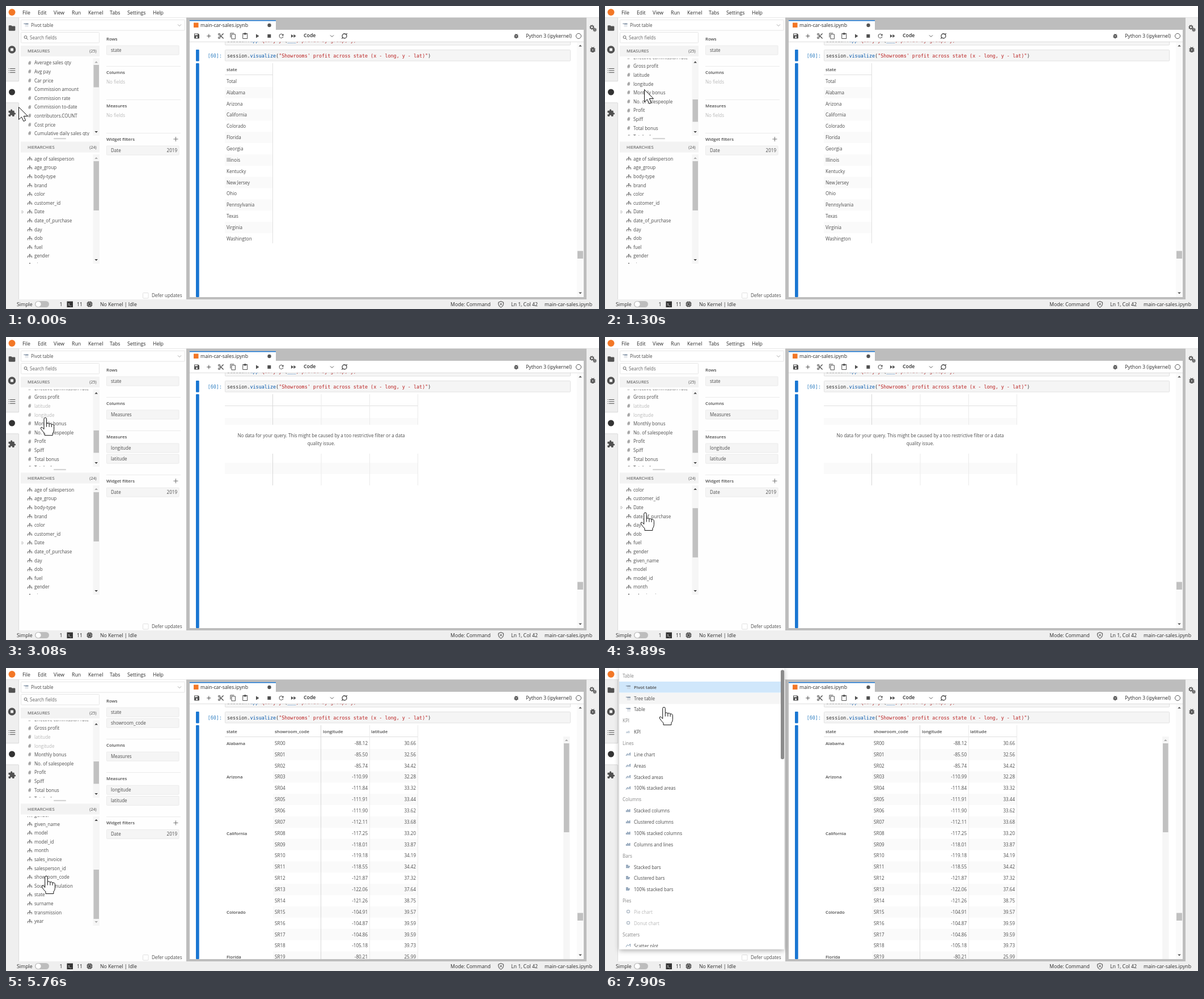
Recreate the animation shown at these times as an HTML page. Size 1046 by 535 pixels, loop 7.99 s.

```html
<!DOCTYPE html>
<html lang="en">
<head>
<meta charset="utf-8">
<title>Pivot table in a notebook</title>
<style>
  html, body { margin: 0; width: 100%; height: 100%; overflow: hidden; background: #fff; }
  svg { display: block; width: 100vw; height: 100vh; }
  text { font-family: "Open Sans", "Noto Sans", sans-serif; white-space: pre; }
  .mono { font-family: "DejaVu Sans Mono", monospace; }
</style>
</head>
<body>
<svg viewBox="0 0 1046 535">
  <defs>
    <clipPath id="measuresClip"><rect x="23" y="92.5" width="131" height="136.5"/></clipPath>
    <clipPath id="hierarchiesClip"><rect x="23" y="262" width="131" height="193"/></clipPath>
    <clipPath id="notebookClip"><rect x="324" y="63" width="695" height="451"/></clipPath>
    <clipPath id="menuClip"><rect x="25" y="3" width="291" height="490"/></clipPath>
    <filter id="shadow" x="-10%" y="-10%" width="120%" height="120%">
      <feDropShadow dx="0" dy="3" stdDeviation="4" flood-opacity=".3"/>
    </filter>
  </defs>
  <g id="chrome"></g>
  <g id="live"></g>
</svg>
<script>
const LOOP = 7990, ROW = 15.6, LINE = 19.86, NOTCH = 70.8;
const INK = '#4c4c4c', UI = '#2b2b2b', PALE = '#b9b9b9', BLUE = '#1976d2';

// Drawing helpers: each returns SVG markup. Text y is the visual middle.
const text = (x, y, s, { size = 8.05, fill = INK, weight = 400, anchor = 'start', cls = '' } = {}) =>
  `<text x="${x}" y="${y + size * .36}" font-size="${size}" fill="${fill}" font-weight="${weight}" text-anchor="${anchor}" class="${cls}">${s}</text>`;
const uiText = (x, y, s, weight = 400) => text(x, y, s, { size: 8.75, fill: UI, weight });
const strong = (x, y, s) => text(x, y, s, { size: 7.75, weight: 600 });
const rect = (x, y, w, h, fill, extra = '') =>
  `<rect x="${x}" y="${y}" width="${w}" height="${h}" fill="${fill}" ${extra}/>`;
const box = (x, y, w, h, fill, stroke) => rect(x + .5, y + .5, w - 1, h - 1, fill, `stroke="${stroke}" rx="1"`);
const path = (d, fill = 'none', stroke = 'none', width = 1) =>
  `<path d="${d}" fill="${fill}" stroke="${stroke}" stroke-width="${width}" fill-rule="evenodd"/>`;
const circle = (x, y, r, fill, extra = '') => `<circle cx="${x}" cy="${y}" r="${r}" fill="${fill}" ${extra}/>`;
const at = (x, y, content, scale = 1) => `<g transform="translate(${x} ${y}) scale(${scale})">${content}</g>`;
const clip = (id, content) => `<g clip-path="url(#${id})">${content}</g>`;
const chevron = (x, y, color) => path(`M${x - 3} ${y - 1.5}l3 3 3-3`, 'none', color, 1);
const triangle = (x, y, dir, color) => path(`M${x - 2.8} ${y + 1.5 * dir}h5.6l-2.8 ${-3 * dir}z`, color);

const GLYPHS = {
  folder: 'M10 4H4c-1.1 0-2 .9-2 2v12c0 1.1.9 2 2 2h16c1.1 0 2-.9 2-2V8c0-1.1-.9-2-2-2h-8z',
  halt: 'M12 0a12 12 0 1 0 0 24 12 12 0 0 0 0-24zM7.5 8.3q0-.8.8-.8h7.4q.8 0 .8.8v7.4q0 .8-.8.8H8.3q-.8 0-.8-.8z',
  list: 'M2 5h2v2H2zm0 6h2v2H2zm0 6h2v2H2zM6 5h16v2H6zm0 6h16v2H6zm0 6h16v2H6z',
  puzzle: 'M20.5 11H19V7c0-1.1-.9-2-2-2h-4V3.5a2.5 2.5 0 0 0-5 0V5H4c-1.1 0-2 .9-2 2v3.8h1.5a2.7 2.7 0 0 1 0 5.4H2V20c0 1.1.9 2 2 2h3.8v-1.5a2.7 2.7 0 0 1 5.4 0V22H17c1.1 0 2-.9 2-2v-4h1.5a2.5 2.5 0 0 0 0-5z',
  bug: 'M20 8h-2.8a6 6 0 0 0-1.8-2L17 4.4 15.6 3l-2.2 2.2a6 6 0 0 0-2.8 0L8.4 3 7 4.4 8.6 6a6 6 0 0 0-1.8 2H4v2h2.1L6 12H4v2h2l.1 2H4v2h2.8a6 6 0 0 0 10.4 0H20v-2h-2.1l.1-2h2v-2h-2l-.1-2H20zm-6 8h-4v-2h4zm0-4h-4v-2h4z',
  save: 'M17 3H5c-1.1 0-2 .9-2 2v14c0 1.1.9 2 2 2h14c1.1 0 2-.9 2-2V7zm-5 16a3 3 0 1 1 0-6 3 3 0 0 1 0 6zm3-10H5V5h10z',
  add: 'M19 13h-6v6h-2v-6H5v-2h6V5h2v6h6z',
  cut: 'M9.6 7.6A4 4 0 1 0 7.6 9.6L10 12l-2.4 2.4a4 4 0 1 0 2 2L12 14l7 7h3v-1zM6 8a2 2 0 1 1 0-4 2 2 0 0 1 0 4zm0 12a2 2 0 1 1 0-4 2 2 0 0 1 0 4zM19 3l-6 6 2 2 7-7V3z',
  copy: 'M16 1H4c-1.1 0-2 .9-2 2v14h2V3h12zm3 4H8c-1.1 0-2 .9-2 2v14c0 1.1.9 2 2 2h11c1.1 0 2-.9 2-2V7c0-1.1-.9-2-2-2zm0 16H8V7h11z',
  paste: 'M19 2h-4.2a3 3 0 0 0-5.6 0H5a2 2 0 0 0-2 2v16a2 2 0 0 0 2 2h14a2 2 0 0 0 2-2V4a2 2 0 0 0-2-2zm0 18H5V4h2v3h10V4h2z',
  run: 'M8 5v14l11-7z',
  stop: 'M6 6h12v12H6z',
  restart: 'M17.7 6.3A8 8 0 1 0 19.7 14h-2.1A6 6 0 1 1 16.2 7.8L13 11h7V4z',
  forward: 'M4 18l8.5-6L4 6zm9-12v12l8.5-6z',
};
const glyph = (name, x, y, size = 12, fill = '#505050') =>
  at(x - size / 2, y - size / 2, path(GLYPHS[name], fill), size / 24);
const gear = (x, y, r) => circle(x, y, r, 'none', 'stroke="#505050" stroke-width="1.5"') +
  circle(x, y, r + 1.2, 'none', `stroke="#505050" stroke-width="1.3" pathLength="16" stroke-dasharray="1 1"`);
const tableIcon = (x, y) => rect(x - 2, y - 3, 6, 2, '#8292a5') + rect(x - 4, y - 3, 1.5, 1.5, '#8292a5') +
  path(`M${x - 2} ${y + .5}h6M${x - 2} ${y + 2.5}h6`, 'none', '#c3cad2', .8);

function drawChrome() {
  let s = rect(0, 20, 23, 515, '#efefef') + rect(1024, 20, 22, 498, '#efefef') + rect(0, 518, 1046, 17, '#efefef')
    + rect(0, 20, 1046, .8, '#dcdcdc') + rect(23, 20.8, 295, 497.2, '#fefefe') + rect(22.3, 21, .7, 497, '#d5d5d5')
    + rect(0, 133, 23, 38, '#fff') + rect(0, 132.5, 22, .7, '#ccc') + rect(0, 170.5, 22, .7, '#ccc')
    + rect(318, 20.5, 706, 497.5, '#bdbdbd') + rect(324, 42, 695, 472, '#fff')
    + rect(324, 25, 152, 18, '#fff') + rect(324, 25, 152, 1.5, BLUE);
  s += circle(10.5, 11, 6, '#f37726') + circle(10.5, 152, 5.5, '#333');
  [['File', 29], ['Edit', 56], ['View', 84], ['Run', 116], ['Kernel', 145], ['Tabs', 183], ['Settings', 214], ['Help', 259]]
    .forEach(([label, x]) => s += uiText(x, 12, label));
  s += glyph('folder', 10.5, 39, 14) + glyph('halt', 10.5, 77, 13.5) + glyph('list', 10.5, 114, 14) + glyph('puzzle', 10.5, 189, 14.5)
    + gear(1033.5, 37.5, 2.4) + gear(1038.5, 42, 1.6) + glyph('bug', 1035, 77, 13.5);

  s += rect(331, 29.5, 8.5, 8.5, '#f37726') + uiText(343, 34, 'main-car-sales.ipynb') + circle(464.5, 34, 3.2, '#555');
  Object.keys(GLYPHS).slice(5).forEach((name, i) => s += glyph(name, 336.5 + 21.3 * i, 53));
  s += uiText(525, 52, 'Code', 600) + chevron(575, 53, '#555')
    + circle(597, 53, 4, 'none', 'stroke="#444" stroke-width="1.3"') + path('M592 57.5l3-2M602 48.5l-3 2', 'none', '#444', 1.4)
    + glyph('bug', 900, 53, 11) + uiText(917, 53, 'Python 3 (ipykernel)') + circle(1010, 53, 4.5, '#fff', 'stroke="#555"');

  const code = (x, y, str, fill, anchor) => text(x, y, str, { size: 8.42, fill, cls: 'mono', anchor });
  const string = `"Showrooms' profit across state (x - long, y - lat)"`;
  const span = (fill, str) => `<tspan fill="${fill}">${str}</tspan>`;
  s += clip('notebookClip', box(386, 50, 610, 19.5, '#f5f5f5', '#e0e0e0')
    + code(390, 60.5, `session.${span('#05a', 'app')} ${span('#a22', 'query y')} (` + span('#05a', '___') + span('#a22', ', profit by group, y)'), '#333'));
  s += rect(324, 62.8, 695, .8, '#d6d6d6') + rect(335, 77, 5.7, 20.5, BLUE, 'rx="1"') + rect(335, 101, 5.7, 413, BLUE, 'rx="1"')
    + box(386, 77, 610, 20.5, '#f5f5f5', '#e2e2e2') + code(381, 87.5, '[60]:', '#307fc1', 'end')
    + code(390, 87.5, 'session.' + span('#05a', 'visualize') + '(' + span('#ba2121', string) + ')', '#333')
    + rect(1007, 64, 12, 450, '#fafafa') + triangle(1013, 70, 1, '#555') + triangle(1013, 507, -1, '#555')
    + rect(1008, 432.5, 10, 13.5, '#c1c1c1');

  s += text(42, 56, 'Search fields', { fill: '#666' }) + circle(34.5, 55, 2.4, 'none', 'stroke="#555" stroke-width=".9"')
    + path('M36.3 57l2.5 2.5', 'none', '#555', 1);
  [['MEASURES', 25, 79.5], ['HIERARCHIES', 24, 249]].forEach(([label, n, y]) => s += rect(26, y - 9.5, 139, 19, '#f3f3f3')
    + text(38, y, label, { size: 7.7 }) + text(159.5, y, `(${n})`, { size: 7, anchor: 'end' }));
  s += rect(84, 233, 22, 2.2, '#d4d4d4', 'rx="1"') + box(241, 506, 10.5, 10.5, '#fff', '#e0e0e0')
    + text(257, 511, 'Defer updates');

  s += uiText(19, 527, 'Simple') + rect(51, 521, 25, 11, '#bdbdbd', 'rx="5.5"') + circle(57, 526.5, 4.6, '#fff')
    + uiText(94.5, 527, '1') + rect(107.5, 521.5, 10.5, 10.5, '#333') + text(109.5, 526.5, 's_', { size: 6.5, fill: '#fff' })
    + uiText(125, 527, '11') + rect(144, 523, 7, 7, 'none', 'stroke="#444" stroke-width="1.4" rx="1"') + rect(146, 525, 3, 3, '#444')
    + path('M146 521v11M149 521v11M142 525h11M142 528h11', 'none', '#444', .7)
    + uiText(166, 527, 'No Kernel | Idle') + uiText(784, 527, 'Mode: Command')
    + path('M873 521.5l4.5 1.7v3q0 4-4.5 6-4.5-2-4.5-6v-3zM871 524.5l4 4M875 524.5l-4 4', 'none', '#444', 1)
    + uiText(891, 527, 'Ln 1, Col 42') + uiText(950, 527, 'main-car-sales.ipynb');
  return s;
}

const MEASURES = ['Average sales qty', 'Avg pay', 'Car price', 'Commission amount', 'Commission rate', 'Commission to-date',
  'contributors.COUNT', 'Cost price', 'Cumulative daily sales qty', 'Daily profit', 'Daily sales qty', 'Dealer margin',
  'Discount rate', 'Effective commission rate', 'Gross profit', 'latitude', 'longitude', 'Monthly bonus', 'No. of salespeople',
  'Profit', 'Spiff', 'Total bonus', 'Total sales', 'Total sales qty', 'Unit price'];
const HIERARCHIES = ['age of salesperson', 'age_group', 'body-type', 'brand', 'color', 'customer_id', 'Date', 'date_of_purchase',
  'day', 'dob', 'fuel', 'gender', 'given_name', 'model', 'model_id', 'month', 'sales_invoice', 'salesperson_id', 'showroom_code',
  'Source Simulation', 'state', 'surname', 'transmission', 'year'];
const STATES = ['Total', 'Alabama', 'Arizona', 'California', 'Colorado', 'Florida', 'Georgia', 'Illinois', 'Kentucky',
  'New Jersey', 'Ohio', 'Pennsylvania', 'Texas', 'Virginia', 'Washington'];
const SHOWROOMS = { Alabama: '-88.12 30.66,-85.50 32.56,-85.74 34.42',
  Arizona: '-110.99 32.28,-111.84 33.32,-111.91 33.44,-111.90 33.62,-112.11 33.68',
  California: '-117.25 33.20,-118.01 33.87,-119.18 34.19,-118.55 34.42,-121.87 37.32,-122.06 37.64,-121.26 38.75',
  Colorado: '-104.91 39.57,-104.87 39.59,-104.86 39.59,-105.18 39.73', Florida: '-80.21 25.99' };
const CHARTS = { Table: ['Pivot table', 'Tree table', 'Table'], KPI: ['KPI'],
  Lines: ['Line chart', 'Areas', 'Stacked areas', '100% stacked areas'],
  Columns: ['Stacked columns', 'Clustered columns', '100% stacked columns', 'Columns and lines'],
  Bars: ['Stacked bars', 'Clustered bars', '100% stacked bars'], Pies: ['Pie chart', 'Donut chart'], Scatters: ['Scatter plot'] };

// Timeline
const CURSOR = [[0, 22, 178], [70, 22, 178], [500, 69, 147], [1450, 69, 147], [1545, 69, 128], [2270, 69, 128], [2350, 69, 118],
  [2890, 69, 118], [3690, 71, 310], [4740, 71, 310], [4850, 71, 335], [4945, 71, 335], [5130, 71, 367], [6000, 71, 367],
  [6890, 132, 43], [6960, 132, 43], [7250, 125, 30], [7790, 125, 30], [7880, 104, 69]];
const CLICKS = [[1800, 1895], [2520, 2700], [5380, 5560], [7250, 7430]];
const HOVERS = [[1540, 2260, 'longitude'], [2350, 2700, 'latitude'], [4130, 4300, 'date_of_purchase'],
  [4840, 5020, 'month'], [5020, 5110, 'sales_invoice'], [5110, 5560, 'showroom_code']];
const LONGITUDE = 2260, LATITUDE = 2700, SHOWROOM = 5560, MENU = 7430;
const within = (t, [from, to]) => t >= from && t < to;
const clamp01 = p => Math.min(1, Math.max(0, p));

function cursorAt(t) {
  const i = CURSOR.findIndex(k => k[0] > t);
  if (i < 0) return CURSOR.at(-1).slice(1);
  const [t0, x0, y0] = CURSOR[i - 1], [t1, x1, y1] = CURSOR[i];
  const p = (t - t0) / (t1 - t0), e = p * p * (3 - 2 * p);
  return [x0 + (x1 - x0) * e, y0 + (y1 - y0) * e];
}
const scrollAt = (t, starts, max) =>
  Math.min(max, starts.reduce((sum, s) => sum + NOTCH * (1 - (1 - clamp01((t - s) / 170)) ** 2), 0));

function fieldList(items, { clipId, first, top, bottom, thumb, ratio, max, offset, icon, hover, used = [] }) {
  const rows = items.map((name, i) => {
    const y = first + i * ROW - offset, hot = name === hover;
    if (y < top - ROW || y > bottom + ROW) return '';
    return (hot ? rect(26, y - 7.8, 127.5, ROW, '#f3f3f3') : '') + icon(y)
      + (name === 'Date' ? path(`M28 ${y - 2.5}l3 2.5-3 2.5z`, 'none', '#aaa', .7) : '')
      + `<g ${hot ? 'text-decoration="underline"' : ''}>${text(50, y, name, { fill: used.includes(name) ? PALE : INK })}</g>`;
  }).join('');
  return clip(clipId, rows) + rect(153.5, top, 11.5, bottom - top, '#f6f6f6')
    + triangle(159.2, top + 6.5, 1, offset ? '#444' : '#aaa') + triangle(159.2, bottom - 6.5, -1, offset < max ? '#444' : '#aaa')
    + rect(154.5, thumb[0] + offset * ratio, 9.5, thumb[1], '#c1c1c1');
}
const hashIcon = y => text(39, y, '#', { size: 8.5, fill: '#555' });
const treeIcon = y => path(`M38.5 ${y + 3}v-3.2h7v3.2M42 ${y + 3}v-6`, 'none', '#555', .9) + circle(42, y - 2.8, 1, '#555');

function fieldPanel(t) {
  const sections = [['Rows', ['state']], ['Columns', []], ['Measures', []], ['Widget filters', ['Date']]];
  if (t >= LONGITUDE) { sections[1][1].push('Measures'); sections[2][1].push('longitude'); }
  if (t >= LATITUDE) sections[2][1].push('latitude');
  if (t >= SHOWROOM) sections[0][1].push('showroom_code');
  let y = 58, s = '';
  for (const [title, chips] of sections) {
    s += strong(177, y, title);
    chips.forEach((name, i) => s += box(177, y + 11.5 + 19.2 * i, 128.5, 17, '#f5f5f5', '#ebebeb') + text(185, y + 20 + 19.2 * i, name));
    if (!chips.length) s += text(177, y + 17, 'No fields', { fill: PALE });
    const extra = 19.2 * Math.max(0, chips.length - 1);
    if (title === 'Widget filters') s += text(302, y + 20, '2019', { anchor: 'end' }) + path(`M295.5 ${y}h8M299.5 ${y - 4}v8`, 'none', '#666', .9);
    else s += rect(177, y + 48 + extra, 131, .8, '#e6e6e6');
    y += 59 + extra;
  }
  return s;
}

const rule = (x, y, w, h, color = '#e0e0e0') => rect(x, y, w, h, color);
const stripes = (x, w, rows) => Array.from({ length: rows }, (_, i) => i % 2 ? rect(x, 123 + LINE * i, w, LINE, '#fafafa') : '').join('');

function statesTable() {
  return stripes(386, 84, 15) + strong(389, 112, 'state') + rule(386, 121, 84, 1) + rule(470, 101, 1, 318)
    + STATES.map((name, i) => text(389, 133 + LINE * i, name)).join('');
}
function emptyTable() {
  return stripes(386, 341, 7) + rule(386, 121, 341, 1) + rule(470, 101, 1, 161, '#d8d8d8')
    + [555.5, 641, 726].map(x => rule(x, 101, 1, 161, '#ebebeb')).join('') + rect(386, 155, 342, 51, '#fff')
    + text(556, 174, 'No data for your query. This might be caused by a too restrictive filter or a data', { anchor: 'middle' })
    + text(556, 188, 'quality issue.', { anchor: 'middle' });
}
function showroomTable() {
  let s = stripes(471, 256, 20) + ['state', 'showroom_code', 'longitude', 'latitude'].map((h, i) => strong(389 + 85 * i, 112, h)).join('')
    + rule(386, 121, 341, 1) + rule(555, 101, 1, 413, '#d8d8d8') + rule(641, 101, 1, 413, '#ebebeb') + rule(726, 101, 1, 413, '#ebebeb');
  let n = 0;
  for (const [state, places] of Object.entries(SHOWROOMS)) {
    s += strong(389, 133 + LINE * n, state);
    for (const place of places.split(',')) {
      const y = 133 + LINE * n, [lon, lat] = place.split(' ');
      s += text(474, y, 'SR' + String(n++).padStart(2, '0')) + text(638, y, lon, { anchor: 'end' }) + text(723, y, lat, { anchor: 'end' });
    }
  }
  return s + rect(983, 121, 11.5, 393, '#f6f6f6') + triangle(988.7, 127.5, 1, '#aaa') + rect(984, 133, 9.5, 157, '#c1c1c1');
}

function chartIcon(group, x, y) {
  const color = '#7890aa';
  if (group === 'Table') return tableIcon(x, y);
  if (group === 'KPI') return text(x - 4, y, 'a8', { size: 6, fill: color });
  if (group === 'Columns') return [3, 5, 4, 5].map((h, i) => rect(x - 4 + 2 * i, y + 2 - h, 1.4, h, color)).join('');
  if (group === 'Bars') return [4, 7, 6].map((w, i) => rect(x - 4, y - 4 + 2 * i, w, 1.5, color)).join('');
  if (group === 'Pies') return circle(x, y - 1, 2.5, 'none', 'stroke="#b5bfca" stroke-width="1.5"');
  return path(`M${x - 4} ${y + 2}l2.5-4 2 2 3-3.5v5`, group === 'Lines' ? '#ccd6e0' : 'none', color, .9);
}
function chartMenu(t) {
  let y = 14, s = rect(25, 24, 290.5, 19.5, '#d0e7fb') + (t >= 7870 ? rect(25, 44, 290.5, 19.5, '#f5f5f5') : '');
  for (const [group, names] of Object.entries(CHARTS)) {
    s += text(31, y, group, { fill: '#858585' });
    for (const name of names) {
      y += LINE;
      s += chartIcon(group, 41, y) + (name === 'Pivot table' ? strong(51, y, name) : text(51, y, name, { fill: group === 'Pies' ? PALE : INK }));
    }
    y += LINE;
  }
  return rect(25, 0, 291, 496.5, '#fff', 'filter="url(#shadow)"') + clip('menuClip', s) + rect(310, 3.5, 6, 157.5, '#8b8b8b', 'rx="2.5"');
}

const ARROW = path('M.5 .5V22.5L5.5 18 9 25.5 12.5 24 9.3 16.5H16.5z', '#fff', '#111', 1);
const HAND = path('M-2.3 2.5a2.3 2.3 0 0 1 4.6 0V10.5q2.5-1.8 4.6.6 2.6-1.4 4.2 1 4.3-.6 4.3 3V21.5q0 4-2.5 6.5v3.5H-1V28Q-4 25.5-7.6 20-8.4 16.5-5.6 17L-2.3 20.5z', '#fff', '#111', 1)
  + path('M2.3 10.5v6M6.9 11.1v5.6M11.1 12.1v4.8', 'none', '#111', 1);

function drawLive(t) {
  const hover = HOVERS.find(h => within(t, h))?.[2];
  const used = [t >= LONGITUDE && 'longitude', t >= LATITUDE && 'latitude'];
  const [x, y] = cursorAt(t);
  const table = t < 2350 ? statesTable() : t < 5650 ? emptyTable() : showroomTable();
  return box(26, 24, 290, 19.5, '#fff', within(t, [6980, MENU]) ? '#6fb3ee' : '#e6e6e6') + tableIcon(35.5, 33.5)
    + text(44, 34, 'Pivot table') + chevron(306, 34, '#aaa')
    + rect(26.5, 46.5, 138, 18.5, 'none', `stroke="${within(t, [6800, 6980]) ? '#4a9fe8' : '#e6e6e6'}" rx="1"`)
    + fieldList(MEASURES, { clipId: 'measuresClip', first: 100.5, top: 92.5, bottom: 229, thumb: [104, 39.5], ratio: .287, max: 253,
      offset: scrollAt(t, [560, 780, 1100], 253), icon: hashIcon, hover, used })
    + fieldList(HIERARCHIES, { clipId: 'hierarchiesClip', first: 270, top: 262, bottom: 455, thumb: [274, 87], ratio: .452, max: 181.4,
      offset: scrollAt(t, [3759, 4300, 4750], 181.4), icon: treeIcon, hover })
    + fieldPanel(t) + clip('notebookClip', table) + (t >= MENU ? chartMenu(t) : '')
    + (CLICKS.some(c => within(t, c)) ? circle(x + .5, y + 4, 21, 'rgba(255,235,0,.35)') : '')
    + at(x, y, t < 1540 ? ARROW : HAND);
}

// The screen is sampled about eleven times a second.
const TICK = 89.2, PHASE = 35;
const live = document.getElementById('live');
document.getElementById('chrome').innerHTML = drawChrome();
let shown = null;
function frame() {
  const t = performance.now() % LOOP;
  const sample = Math.max(0, PHASE + Math.floor((t - PHASE) / TICK) * TICK);
  if (sample !== shown) live.innerHTML = drawLive(shown = sample);
  requestAnimationFrame(frame);
}
frame();
</script>
</body>
</html>
```
